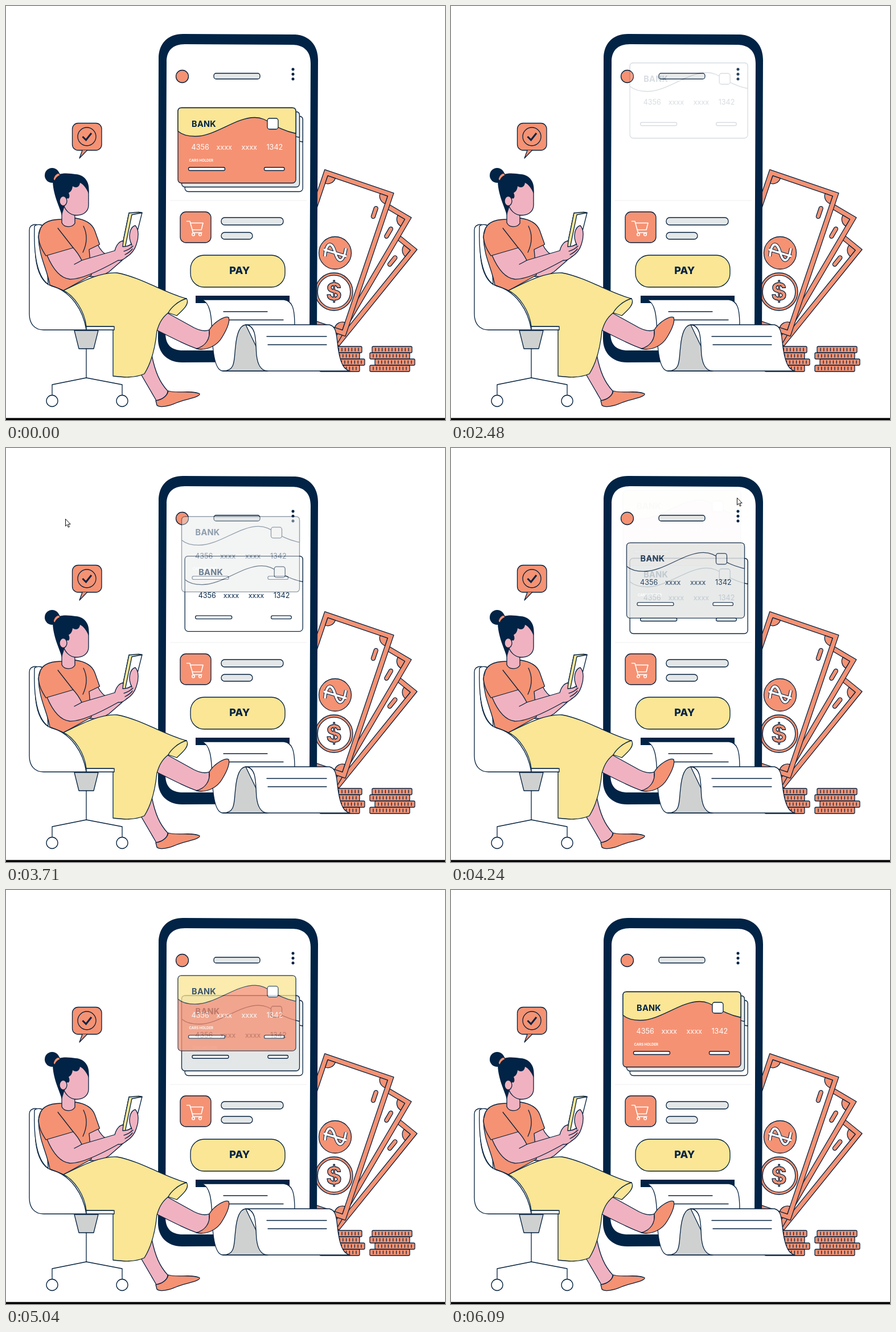
Animation of 771 by 726 pixels, one loop 7200 ms. Source, as an HTML page:

```html
<!DOCTYPE html>
<html lang="en">
<head>
<meta charset="utf-8">
<title>Mobile payment</title>
<style>
html, body { margin: 0; width: 100%; height: 100%; overflow: hidden; background: #fff; }
svg { display: block; width: 100vw; height: 100vh; font-family: Inter, "Open Sans", sans-serif; }
.l { stroke: #04213f; stroke-width: 1.3; stroke-linejoin: round; stroke-linecap: round; }
</style>
</head>
<body>
<svg id="stage" viewBox="0 0 771 726" preserveAspectRatio="none"></svg>
<script>
const NAVY = '#012345', CORAL = '#f59273', YELLOW = '#fae695', PINK = '#f0b2c0',
      PALE = '#e4e7e7', GREY = '#cfd1d1', WHITE = '#fff';
const LOOP = 7200;

const shape = (d, fill = 'none') => `<path class="l" d="${d}" fill="${fill}"/>`;
const flat = (d, fill) => `<path d="${d}" fill="${fill}"/>`;
const box = (x, y, w, h, r, fill) =>
  `<rect class="l" x="${x}" y="${y}" width="${w}" height="${h}" rx="${r}" fill="${fill}"/>`;
const disc = (x, y, r, fill) => `<circle class="l" cx="${x}" cy="${y}" r="${r}" fill="${fill}"/>`;
const label = (x, y, size, weight, fill, text, extra = '') =>
  `<text x="${x}" y="${y}" font-size="${size}" font-weight="${weight}" fill="${fill}" ${extra}>${text}</text>`;

// A note hangs from its top right corner.
function note(x, y, angle, len) {
  const w = 128, inset = 8.5, r = 14;
  const corner = (sx, sy) =>
    `<g transform="translate(${sx > 0 ? inset - w : -inset} ${sy > 0 ? inset : len - inset}) scale(${sx} ${sy})">` +
    shape(`M0 0H${r}A${r} ${r} 0 0 1 0 ${r}Z`, CORAL) + '</g>';
  return `<g transform="translate(${x} ${y}) rotate(${angle})">` +
    box(-w, 0, w, len, 0, CORAL) + box(inset - w, inset, w - 2 * inset, len - 2 * inset, 0, WHITE) +
    corner(1, 1) + corner(-1, 1) + corner(1, -1) + corner(-1, -1) +
    box(-24.5, 32, 7, 22, 3.5, CORAL) + '</g>';
}

function coins(x) {
  return [4, 0, 9, 0].map((dx, i) => {
    const left = x + dx, top = 597 + i * 11;
    let ticks = '';
    for (let k = 0; k < 11; k++) ticks += `M${left + 6 + k * 5.8} ${top + 3}v5`;
    return box(left, top, 70, 11, 2, CORAL) + shape(ticks);
  }).join('');
}

function money() {
  const sign = 'M560 439C563 411 573 414 578 432S592 453 597 425M558 427L598 439';
  const line = (w, c) => `<path d="${sign}" fill="none" stroke="${c}" stroke-width="${w}"/>`;
  return note(722, 427, 39, 218) + note(712, 371, 30.5, 255) + note(681, 328, 18.7, 265) +
    disc(578, 433, 28.5, CORAL) + line(6, NAVY) + line(3.8, WHITE) +
    disc(576, 501, 33, CORAL) + disc(576, 501, 28.8, WHITE) +
    label(576, 516, 42, 700, CORAL, '$', 'text-anchor="middle" class="l"') +
    coins(551) + coins(639);
}

function phone() {
  return flat('M268 92C268 66 284 49 311 49L506 50C532 51 548 68 548 95L546 583C546 610 530 624 506 624L309 625C283 625 267 608 267 584Z', NAVY) +
    flat('M282 98C282 78 293 67 314 67L504 68C524 69 535 80 535 101L533 572C533 594 522 604 503 604L311 604C290 604 280 594 280 573Z', WHITE) +
    disc(309.5, 123.5, 11, CORAL) + box(365, 118, 81, 10, 4, PALE) +
    [111, 119.5, 128].map(y => `<circle cx="504" cy="${y}" r="2.5" fill="${NAVY}"/>`).join('') +
    '<path d="M288 341H528" stroke="#eee"/>' +
    box(306, 361, 54, 54, 10, CORAL) +
    `<g fill="none" stroke="${WHITE}" stroke-width="1.6" stroke-linejoin="round" stroke-linecap="round">
      <path d="M317.5 377.5H323L328.5 397.5H344M324 380.5H346L343 392.5H327"/>
      <circle cx="329" cy="400.5" r="2.3"/><circle cx="341" cy="400.5" r="2.3"/></g>` +
    box(378, 371, 109, 13, 6, PALE) + box(378, 397, 55, 12, 6, PALE) +
    box(324, 437, 166, 56, 24, YELLOW) +
    label(410.3, 470.3, 18, 800, NAVY, 'PAY', 'text-anchor="middle"');
}

function receipt() {
  return flat('M333 508H498V521H333Z', NAVY) +
    shape('M344 515H488C503 517 507 530 507 561L458 640H381C368 640 363 610 362 575C361 540 358 520 344 515Z', WHITE) +
    shape('M382 536H459M382 550.5H487') +
    shape('M381 640C404 640 400 620 403 598C405 575 410 560 421 559L460 640Z', GREY) +
    shape('M421 559C441 560 438 590 440 612C442 630 448 640 460 640H604C594 638 588 628 584 605C580 580 582 562 568 559Z', WHITE) +
    shape('M458 579.5H563M460 594H563');
}

function chair() {
  return shape('M66 568C50 568 41 557 41 540V393C41 382 55 381 58 386C52 395 50 410 52 440C55 470 66 487 80 491C115 500 136 535 141 568Z', WHITE) +
    shape('M50 386C54 382 66 382 68 390L74 488C50 470 49 420 50 386Z', WHITE) +
    shape('M120 569H162L154 601H128Z', GREY) +
    shape('M141 601V652M81 683V664L141 652L204 664V683') +
    disc(81, 692.5, 10, WHITE) + disc(204, 692.5, 10, WHITE);
}

function woman() {
  return shape('M229 632L264 692C275 690 284 684 284 675C270 660 262 642 256 612Z', PINK) +
    shape('M263 692C272 691 283 685 285 675C300 680 325 673 340 680C342 686 312 690 299 696C286 702 270 705 265 700Z', CORAL) +
    shape('M281 537L330 564C342 570 350 571 357 568L357 590L336 601C322 597 300 586 262 567Z', PINK) +
    shape('M334 601C352 605 371 596 380 580C386 570 394 554 391 546C385 543 366 553 357 568C359 584 350 597 334 601Z', CORAL) +
    // arm and top
    shape('M142 428L161 418C165 427 172 435 179 437L200 428L204 446L181 466C172 472 160 476 146 474Z', PINK) +
    shape('M57 405C58 380 75 374 98 374L122 372C142 375 152 383 156 394L164.5 418L146 427L150 472L101 499C92 495 84 492 77 489C71 458 58 440 57 405Z', CORAL) +
    shape('M136 386C143 400 143 415 135 432') +
    // skirt
    shape('M101 499C130 485 165 466 195 468C235 475 285 506 317 513C323 522 312 532 300 543L285 538C272 548 268 560 265 570C262 600 255 626 243 645C225 653 205 651 188 649V562H141C138 535 120 508 101 499Z', YELLOW) +
    shape('M317 513C302 517 289 530 285 538') +
    box(141, 562, 49, 6, 0, WHITE) +
    // hand-held phone, then the hand around it
    shape('M204 421L216 363L239 362.5L226 414L209 424Z', WHITE) +
    shape('M204 421L216 363L233 361.5L239 362.5L221 366L209 424Z', YELLOW) +
    shape('M72 437L117 423C125 431 130 440 133 446L191 429C194 418 200 412 206 412L205 422C214 422 219 419 222 416L216 436C208 444 203 447 197 446C165 464 132 480 112 479C92 477 80 456 72 437Z', PINK) +
    shape('M221 419C213 404 218 387 227 385C234 392 233 407 229 418C226 428 221 434 212 440', PINK) +
    shape('M133 446C128 449 124 451 120 453M207 430C214 428 219 425 223 421M209 436C215 433 219 430 222 426') +
    shape('M89 387L118 424L70 438C63 427 58 418 57 405C58 390 74 380 89 387Z', CORAL) +
    flat('M58 404C59 386 74 376 94 376L91 389L72 410Z', CORAL) +
    // head
    shape('M98 340L98 380C102 389 116 389 121 381V360Z', PINK) +
    shape('M101 316C120 303 145 306 145 326V349C145 361 135 367 124 367C112 367 103 358 100 345Z', PINK) +
    `<circle cx="81" cy="297" r="13" fill="${NAVY}"/>` +
    flat('M82 304C88 291 109 293 122 295C140 296 148 311 145 329C141 319 136 313 130 310C129 318 123 320 117 316C116 325 112 326 110 328C113 333 111 340 107 337L98 367C94 351 82 331 82 304Z', NAVY) +
    shape('M83 304C84 298 88 293 93 293L95 297C90 299 87 302 86 307Z', CORAL) +
    `<ellipse class="l" cx="100.5" cy="342" rx="6.5" ry="8.5" fill="${PINK}"/>`;
}

function bubble() {
  return box(116.5, 205.5, 51.5, 47.5, 10, CORAL) +
    shape('M134 253L129 267L142.5 253', CORAL) + disc(142, 229, 16, 'none') +
    `<path d="M134.5 229L140.5 235L150 223" fill="none" stroke="${NAVY}" stroke-width="3"/>`;
}

function card(id, body, band, chip, ink) {
  const top = 'M0 41V6Q0 0 6 0H201Q207 0 207 6V45';
  const wave = 'C165 36 160 17 135 17C100 17 66 50 30 50C18 50 7 47 0 41Z';
  const digits = ['4356', 'xxxx', 'xxxx', '1342'].map((s, i) =>
    label(23.5 + i * 44, 73.5, 12.6, 400, ink, s)).join('');
  return `<g id="${id}">` + box(0, 0, 207, 132, 6, body) + shape(top + wave, band) +
    label(24, 33, 14.5, 700, NAVY, 'BANK', 'letter-spacing=".3"') +
    box(157, 18.5, 19, 19, 4, chip) + digits +
    label(19.5, 94, 6, 700, WHITE, 'CARS HOLDER') +
    box(18.5, 104.5, 64, 5.5, 2.5, WHITE) + box(151.5, 104.5, 35.5, 5.5, 2.5, WHITE) + '</g>';
}

document.getElementById('stage').innerHTML =
  `<rect width="771" height="726" fill="${WHITE}"/>` + money() + phone() + receipt() + chair() + woman() + bubble() +
  card('back', WHITE, WHITE, WHITE, NAVY) +
  card('middle', PALE, PALE, PALE, NAVY) +
  card('front', CORAL, YELLOW, WHITE, WHITE) +
  '<rect y="722.5" width="771" height="3.5"/>' +
  '<path id="cursor" d="M.5 .5V13L3.3 10.3L5.3 15L7.3 14.2L5.3 9.6H9.2Z" fill="#fff" stroke="#111"/>';

const cards = [
  { id: 'back', x: 314.2, y: 193.5, start: 2270 },
  { id: 'middle', x: 308.5, y: 185.5, start: 3260 },
  { id: 'front', x: 302, y: 178.5, start: 4208 }
].map(c => ({ ...c, el: document.getElementById(c.id) }));
const cursor = document.getElementById('cursor');
const RESTART = 2210, TICK = 88.3, RISE = 105, ENTER = 1900;

// Same curve as the CSS "ease" keyword.
function ease(p) {
  if (p <= 0 || p >= 1) return p <= 0 ? 0 : 1;
  const bez = (a, b, s) => 3 * a * s * (1 - s) ** 2 + 3 * b * s * s * (1 - s) + s ** 3;
  let lo = 0, hi = 1;
  for (let i = 0; i < 24; i++) {
    const mid = (lo + hi) / 2;
    if (bez(.25, .25, mid) < p) lo = mid; else hi = mid;
  }
  return bez(.1, 1, lo);
}

// Pointer visits: lists of [time, x, y].
const visits = [
  [[380, 315, 363], [1029, 315, 363], [1030, 447, 339], [1120, 447, 339], [1660, 29, 0], [1749, 29, 0]],
  [[3440, 0, 0], [3705, 99, 124], [4510, 704, 68], [4680, 716, 76], [4870, 732, 22], [4959, 732, 22]]
];

function pointerAt(t) {
  for (const v of visits) {
    for (let i = 1; i < v.length; i++) {
      const [t0, x0, y0] = v[i - 1], [t1, x1, y1] = v[i];
      if (t >= t0 && t <= t1) {
        const k = (t - t0) / (t1 - t0);
        return [x0 + (x1 - x0) * k, y0 + (y1 - y0) * k];
      }
    }
  }
  return null;
}

function draw(t) {
  const held = t < RESTART ? t : RESTART + Math.floor((t - RESTART) / TICK + .1) * TICK;
  for (const c of cards) {
    const p = t < RESTART ? 1 : ease((held - c.start) / ENTER);
    c.el.setAttribute('transform', `translate(${c.x} ${(c.y - RISE * (1 - p)).toFixed(2)})`);
    c.el.setAttribute('opacity', (p ** .85).toFixed(3));
  }
  const at = pointerAt(t > 1210 && t < 1750 ? 1210 + Math.floor((t - 1210) / 90) * 90 : held);
  cursor.setAttribute('visibility', at ? 'visible' : 'hidden');
  if (at) cursor.setAttribute('transform', `translate(${Math.round(at[0])} ${Math.round(at[1])})`);
}

const began = performance.now();
function frame() {
  draw((performance.now() - began) % LOOP);
  requestAnimationFrame(frame);
}
frame();
</script>
</body>
</html>
```
